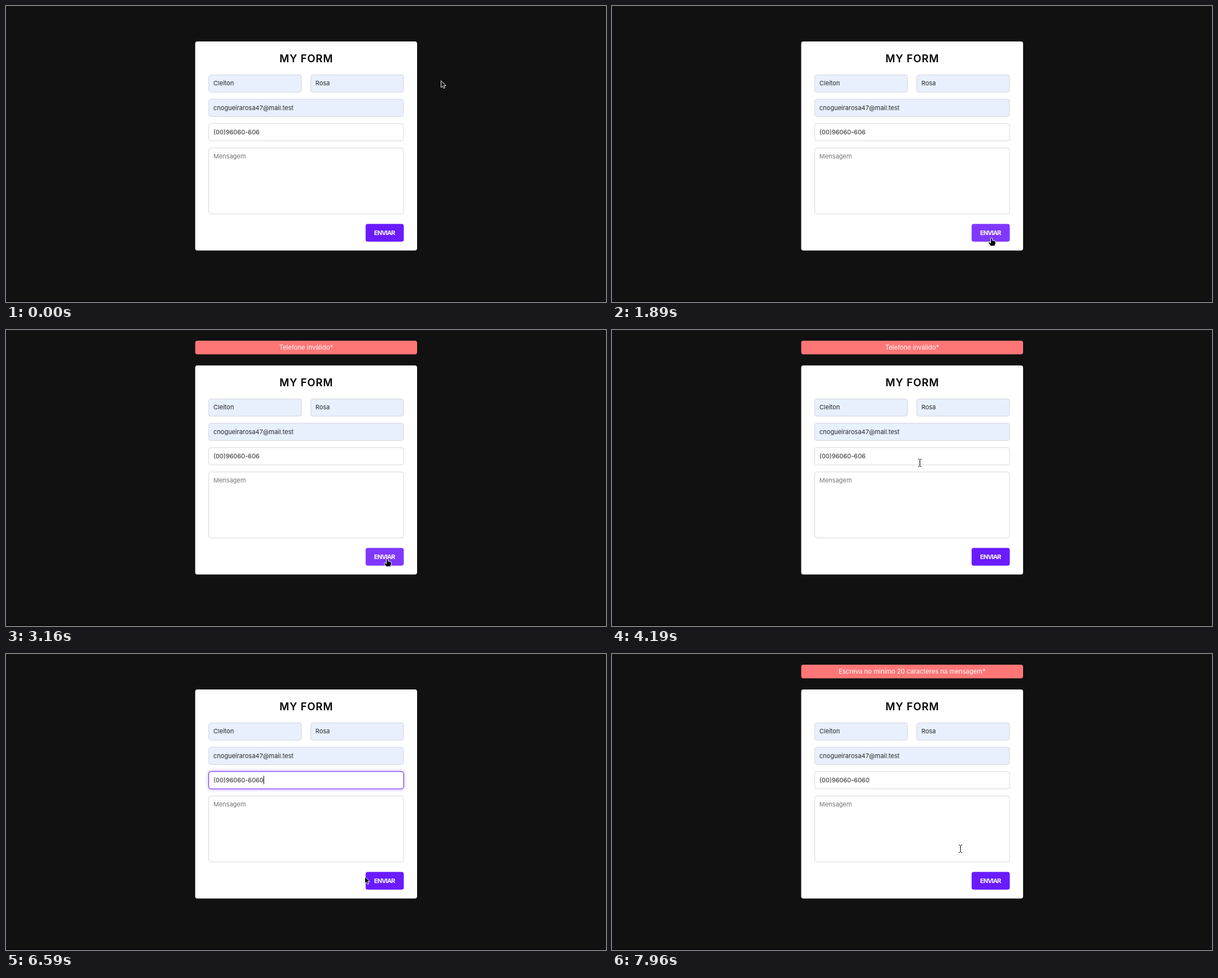
Recreate the animation shown at these times as an HTML page. Size 1064 px wide and 526 px high, loop 8 s.

```html
<!DOCTYPE html>
<html lang="pt">
<head>
<meta charset="utf-8">
<title>My form</title>
<style>
  html, body { margin: 0; width: 100%; height: 100%; overflow: hidden; background: #111; }
  svg { display: block; }
  text { font: 400 14px Inter, "Open Sans", sans-serif; fill: #262626; white-space: pre; }
  .toast { opacity: 0; }
  .toast rect { fill: #ff7676; }
  .toast text { font-size: 14.3px; fill: #fff; }
  .middle { text-anchor: middle; }
  .title { font-size: 23.5px; font-weight: 600; letter-spacing: 1.1px; fill: #000; }
  .box { fill: #fff; stroke: #ccc; }
  .filled { fill: #e8f0fe; }
  .hint { fill: #757575; }
  .halo { fill: #6a1bff; filter: blur(4px); opacity: .55; }
  .ring { fill: #fff; stroke: #6a1bff; stroke-width: 1.2; }
  .send { font-size: 14px; font-weight: 700; letter-spacing: -1.1px; fill: #fff; }
  #pointer path { stroke-linejoin: round; }
</style>
</head>
<body>
<svg width="1064" height="526" viewBox="0 0 1064 526">
  <rect y="524" width="1064" height="2" fill="#090909"/>
  <g id="page">
    <g class="toast" id="phoneError">
      <rect y="24" width="500" height="31" rx="5"/>
      <text class="middle" x="250" y="44.5">Telefone inválido*</text>
    </g>
    <g class="toast" id="messageError">
      <rect y="24" width="500" height="31" rx="5"/>
      <text class="middle" x="250" y="44.5">Escreva no minímo 20 caracteres na mensagem*</text>
    </g>
    <rect y="80" width="500" height="472" rx="5" fill="#fff"/>
    <text class="middle title" x="250.5" y="126.5">MY FORM</text>
    <g id="fields"></g>
    <rect id="button" rx="5"/>
    <text class="middle send" x="426.5" y="517">ENVIAR</text>
  </g>
  <g id="pointer">
    <path id="arrow" d="M.5 .8V12.8L3.3 10.3 5.3 14.5 7.3 13.5 5.5 9.5H9.1Z" fill="#000" stroke="#fff"/>
    <g id="beam" fill="none">
      <path d="M-3 -6.5H3M0 -6.5V6.5M-3 6.5H3" stroke="#fff" stroke-width="2.4" opacity=".7"/>
      <path d="M-3 -6.5H-.8M.8 -6.5H3M0 -6V6M-3 6.5H-.8M.8 6.5H3" stroke="#111" stroke-width="1.2"/>
    </g>
    <path id="hand" fill="#000" stroke="#fff" d="M-1.5 .8Q0 -.8 1.5 .8V4.6L5.6 5.4Q7.2 5.8 7.2 7.4V10.5
      L5.6 14.5H-1.6L-5.4 9.2Q-5.6 7.4 -3.8 7.6L-1.5 9.2Z"/>
  </g>
</svg>
<script>
const LOOP = 8000, STEP = 70;
const SCALE = .787, LEFT = 335.5;
const $ = id => document.getElementById(id);
$("page").setAttribute("transform", `translate(${LEFT}) scale(${SCALE})`);

// Layout in page units, measured from the card's left edge
const rowY = row => 155 + 55 * row;
const field = (row, text, style = "", x = 30, w = 440, h = 40) => ({ x, y: rowY(row), w, h, text, style });
const phone = field(2, "");
const fields = [
  field(0, "Cleiton", "filled", 30, 210),
  field(0, "Rosa", "filled", 260, 210),
  field(1, "cnogueirarosa47@mail.test", "filled"),
  phone,
  field(3, "Mensagem", "hint", 30, 440, 150)
];
const button = { x: 384, y: 492, w: 86, h: 40 };

const rect = ({ x, y, w, h }, style) =>
  `<rect class="${style}" x="${x + .5}" y="${y + .5}" width="${w - 1}" height="${h - 1}" rx="5"/>`;
$("fields").innerHTML = fields.map(f => {
  const focus = f === phone ? `<g id="glow">${rect(f, "halo")}${rect(f, "ring")}</g>` : "";
  const id = f === phone ? ' id="phone"' : "";
  const fill = f.style === "filled" ? "box filled" : "box";
  return rect(f, fill) + focus + `<text class="${f.style === "hint" ? "hint" : ""}"${id} x="${f.x + 11}" y="${f.y + 24.5}">${f.text}</text>`;
}).join("") + `<rect id="caret" y="${phone.y + 10}" width="1.3" height="19"/>`;
for (const [name, value] of Object.entries({ x: button.x, y: button.y, width: button.w, height: button.h }))
  $("button").setAttribute(name, value);

// Each move eases along a curve from the previous place
const home = [771, 132];
const moves = [
  { start: 500, end: 1260, to: [668, 231] },
  { start: 1340, end: 1890, to: [673, 412], bend: [668, 320] },
  { start: 2880, end: 3020, to: [672, 406] },
  { start: 3160, end: 3510, to: [735, 247], bend: [704, 406] },
  { start: 3840, end: 4320, to: [533, 233], bend: [578, 246] },
  { start: 6170, end: 6730, to: [655, 388], bend: [556, 436] },
  { start: 7810, end: 7960, to: [618, 346] }
];

const ramp = (t, from, to) => Math.min(1, Math.max(0, (t - from) / (to - from)));
const ease = p => p < .5 ? 2 * p * p : 1 - 2 * (1 - p) ** 2;
const between = (t, from, to) => t >= from && t < to;
const show = (id, on) => { $(id).style.visibility = on ? "visible" : "hidden"; };

function pointerAt(t) {
  let place = home;
  for (const { start, end, to, bend } of moves) {
    if (t < start) break;
    const steps = Math.round((end - start) / STEP) + 1;
    const q = ease(Math.min(1, (Math.floor((t - start) / STEP + .2) + 1) / steps));
    place = place.map((from, k) => {
      const mid = bend ? bend[k] : (from + to[k]) / 2;
      return (1 - q) ** 2 * from + 2 * q * (1 - q) * mid + q * q * to[k];
    });
  }
  return place.map(Math.round);
}

function over([px, py], { x, y, w, h }) {
  const dx = (px - LEFT) / SCALE - x, dy = py / SCALE - y;
  return dx >= 0 && dx <= w && dy >= 0 && dy <= h;
}

function draw(t) {
  const place = pointerAt(t);
  const hover = over(place, button);
  const typing = fields.some(f => over(place, f));
  $("pointer").setAttribute("transform", `translate(${place})`);
  show("hand", hover);
  show("beam", typing);
  show("arrow", !hover && !typing);
  $("button").style.fill = hover ? "#8038ff" : "#6a1bff";

  $("phone").textContent = "(00)96060-606" + (t < 5500 ? "" : "0");
  $("caret").setAttribute("x", phone.x + 11 + $("phone").getComputedTextLength());
  show("caret", between(t, 4530, 5020) || between(t, 5500, 6100) || between(t, 6580, 7060));
  $("glow").style.opacity = ramp(t, 4460, 4700) - ramp(t, 7060, 7400);
  $("phoneError").style.opacity = ramp(t, 2580, 2690) - ramp(t, 4600, 4720);
  $("messageError").style.opacity = ramp(t, 7100, 7220);
}

const begin = performance.now();
function tick() {
  draw((performance.now() - begin) % LOOP);
  requestAnimationFrame(tick);
}
tick();
</script>
</body>
</html>
```
